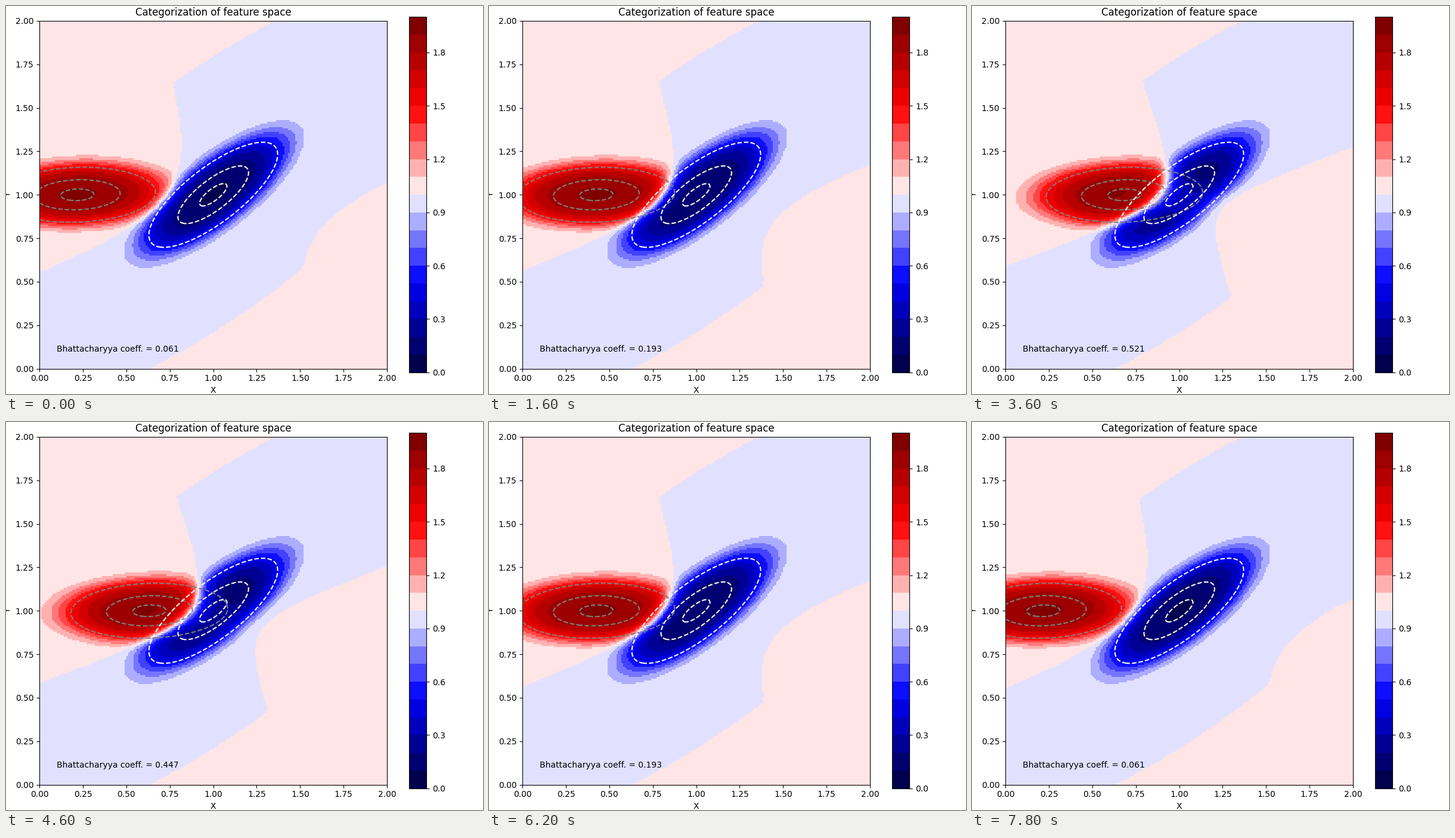
A matplotlib script for the animation above (8 s loop, 800 by 650 pixels).

```python
import math

import matplotlib.pyplot as plt
import numpy as np
from matplotlib.animation import FuncAnimation
from matplotlib.colors import BoundaryNorm

W, H, DPI = 800, 650, 100
STEPS, INTERVAL = 20, 200
CELLS = 200
LEVELS = np.array([0.1, 0.5, 0.9])

RED_COV = (0.044, 0.0013, 0.0054)   # xx, xy, yy
BLUE_COV = (0.0298, 0.0187, 0.0198)


def peak(cov):
    return 1 / (2 * np.pi * math.sqrt(cov[0] * cov[2] - cov[1] ** 2))


def gauss(mean, cov):
    xx, xy, yy = cov
    dx, dy = x - mean[0], y - mean[1]
    form = yy * dx ** 2 - 2 * xy * dx * dy + xx * dy ** 2
    return peak(cov) * np.exp(-form / (xx * yy - xy ** 2) / 2)


def red_mean(step):
    return 0.2175 + 0.02594 * step, 1


def overlap(step):
    """Bhattacharyya coefficient, the red density being cut off at x = 0."""
    m = 0.2 + 0.5 * step / (STEPS - 1)
    inside = (1 + math.erf(m / 0.197 / math.sqrt(2))) / 2
    return math.exp(-0.2081 - 4.165 * (1 - m) ** 2) / math.sqrt(inside)


def category(red):
    """0 is surely blue, 2 surely red; far from both it rounds to exactly 1."""
    ratio = (1 + red) / (1 + blue)
    return np.where(ratio < 1, ratio, 2 - 1 / ratio)[:-1, :-1]


def draw_contours(density, cov, color, zorder):
    return ax.contour(x, y, density, LEVELS * peak(cov), colors=color,
                      linestyles="dashed", linewidths=1.5, zorder=zorder)


def box(left, top, right, bottom):
    return [left / W, 1 - bottom / H, (right - left) / W, (bottom - top) / H]


nodes = np.linspace(0, 2, CELLS + 1)
x, y = np.meshgrid(nodes, nodes)
blue = gauss((1, 1), BLUE_COV)

fig = plt.figure(figsize=(W / DPI, H / DPI), dpi=DPI, facecolor="white")
ax = fig.add_axes(box(56.1, 24.8, 639.1, 607.7))
ax.set_title("Categorization of feature space")
ax.set_xlabel("X")
ax.set_ylabel("Y")

mesh = ax.pcolormesh(x, y, category(gauss(red_mean(0), RED_COV)),
                     cmap="seismic", shading="flat",
                     norm=BoundaryNorm(np.linspace(0, 2, 21), 256))
draw_contours(blue, BLUE_COV, "white", 3)
label = ax.text(0.1, 0.1, "", zorder=4)
ax.set(xlim=(0, 2), ylim=(0, 2))
ax.set_xticks(np.arange(0, 2.1, 0.25))
ax.set_yticks(np.arange(0, 2.1, 0.25))

cax = fig.add_axes(box(676.3, 18.4, 705.3, 613.8))
bar = fig.colorbar(mesh, cax=cax, ticks=np.arange(7) * 0.3, format="%.1f")
bar.ax.minorticks_off()

moving = []


def update(i):
    step = min(i, 2 * STEPS - 1 - i)
    red = gauss(red_mean(step), RED_COV)
    while moving:
        moving.pop().remove()
    mesh.set_array(category(red))
    moving.append(draw_contours(red, RED_COV, "gray", 2))
    label.set_text(f"Bhattacharyya coeff. = {overlap(step):.3f}")
    return mesh, label


anim = FuncAnimation(fig, update, frames=2 * STEPS, interval=INTERVAL,
                     repeat=True, repeat_delay=0, blit=False)
plt.show()
```
